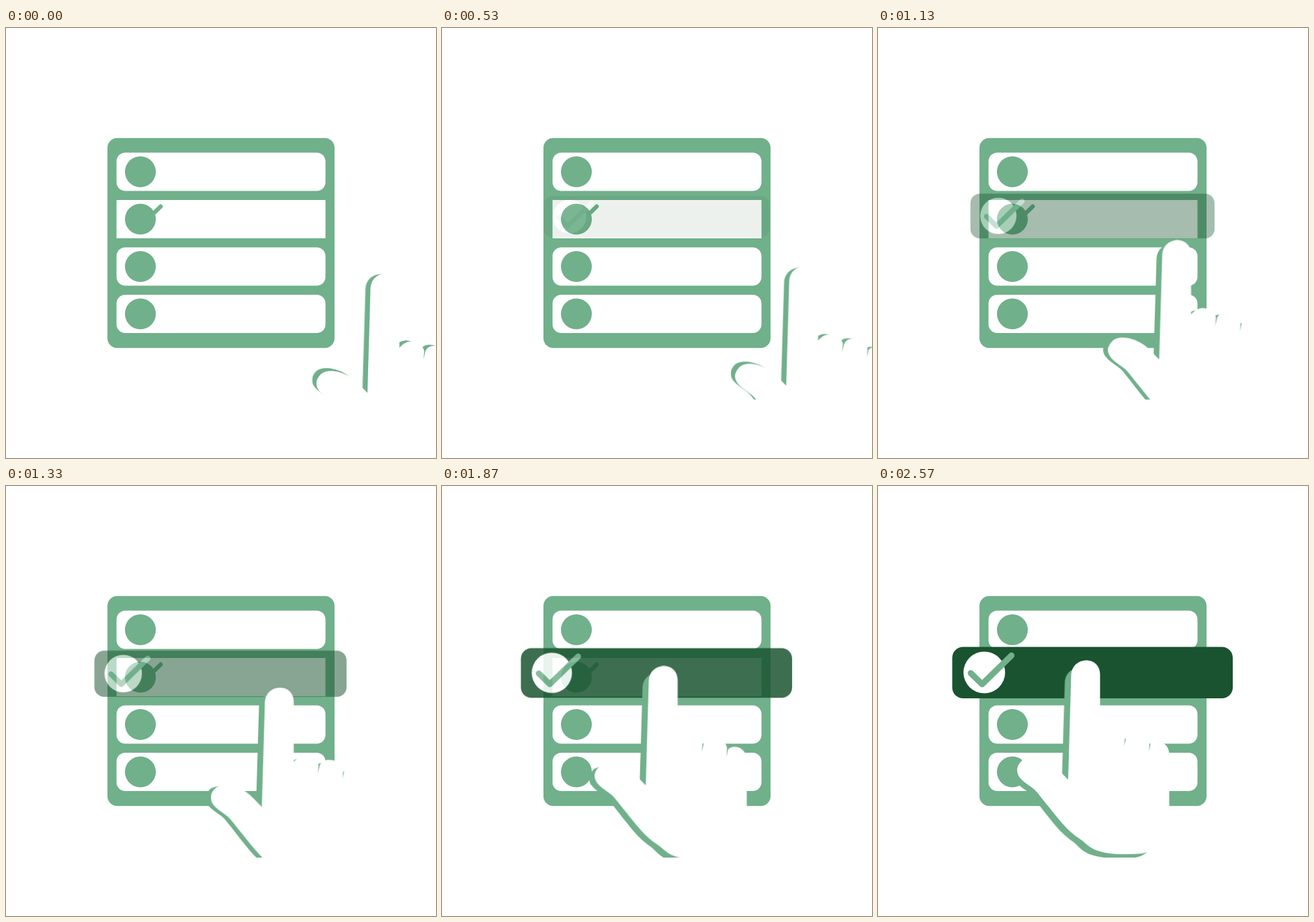
Recreate the animation shown at these times as an HTML page. Size 640 by 640 pixels, loop 2610 ms.

```html
<!DOCTYPE html>
<html lang="en">
<head>
<meta charset="utf-8">
<title>Choosing a list item</title>
<style>
  html, body { margin: 0; height: 100%; overflow: hidden; background: #fff; }
  svg { display: block; width: 100vw; height: 100vh; }

  .green { fill: #70b08a; }
  .white { fill: #fff; }
  .tick { fill: none; stroke: #70b08a; stroke-linecap: round; stroke-linejoin: round; }

  .hand, .shade, .bar { animation: 2610ms ease-in-out infinite; }
  .hand { animation-name: reach; }
  .shade { animation-name: drift; }
  .bar { animation-name: pop; transform-origin: 319.25px 277.75px; }

  @keyframes reach {
    0%, .77% { transform: translate(255px, 106px); }
    89.1%, 100% { transform: none; }
  }
  @keyframes drift {
    0%, .77% { transform: translate(-7.5px, -4px); }
    89.1%, 100% { transform: translate(-9.5px, 6px); }
  }
  @keyframes pop {
    0%, .77% { opacity: 0; transform: translateY(3.5px) scale(.787); }
    98.4%, 100% { opacity: 1; transform: translateY(0) scale(1); }
  }
</style>
</head>
<body>
<svg viewBox="0 0 640 640">
  <clipPath id="floor"><rect width="640" height="552.5"/></clipPath>

  <!-- list -->
  <rect class="green" x="151" y="163.8" width="338" height="312.4" rx="14.5"/>
  <g class="white">
    <rect x="164.5" y="185.5" width="311" height="57" rx="13"/>
    <rect x="164.5" y="256" width="311" height="57"/>
    <rect x="164.5" y="326.5" width="311" height="57" rx="13"/>
    <rect x="164.5" y="397" width="311" height="57" rx="13"/>
  </g>
  <g class="green">
    <circle cx="200" cy="214" r="23"/>
    <circle cx="200" cy="284.5" r="23"/>
    <circle cx="200" cy="355" r="23"/>
    <circle cx="200" cy="425.5" r="23"/>
  </g>
  <path class="tick" stroke-width="6" d="M212 283.5L230.3 265.5"/>

  <!-- chosen item -->
  <g class="bar">
    <rect fill="#19532f" x="110.5" y="239.5" width="417.5" height="76.5" rx="16"/>
    <circle class="white" cx="158.2" cy="277.5" r="31"/>
    <path class="tick" stroke-width="9" d="M138 278.5L155 295L198.7 252.3"/>
  </g>

  <!-- hand: shade, then front -->
  <g clip-path="url(#floor)">
    <g class="hand">
      <path class="green shade" d="M283 437L287.5 287C288 273 298 264.5 310 264.5S330.5 273 330.5 285V372.5
        C336 366.5 341 363 348 363C358 363.5 366 369.5 367 377.5L369.5 377C372 371 378 369.5 383 369.5
        C394 369.5 402 375 403 384L405.5 387C408 382.5 416 381 422 383.5C429 386.5 433.5 393.5 433.5 402.5V476
        C433 500 428 515 419 528C411 540 403 545 393 547C365 549 340 549 322 541C310 535 308 530 300 523.5
        C280 510 270 495 241 458.5C232 445.5 220 442.5 212 432.5C206 425 207 416 214 409
        C220 403 236 402 253 410C264 415 273 427 283 437Z"/>
    </g>
  </g>
  <g clip-path="url(#floor)">
    <g class="hand">
      <path class="white" d="M283 437L287.5 282C288 268 298 259.5 310 259.5S330.5 268 330.5 280V370
        C336 364 341 360.5 348 360.5C358 361 366 367 367.5 375L366.3 387L369.3 375C372 368.5 378 367 383 367
        C394 367 402 372 404 381L403.5 395L405.5 384C408 380 416 378.5 422 381C429 384 433.5 391 433.5 400V476
        C433 500 428 515 419 528C411 540 403 545 393 547C365 549 340 549 322 541C310 535 308 530 300 525
        C280 512 270 497 240 460C231 447 219 444 211 434C205 426 206 417 213 410
        C219 403 236 402 253 411C264 416 273 427 283 437Z"/>
    </g>
  </g>
</svg>
</body>
</html>
```
